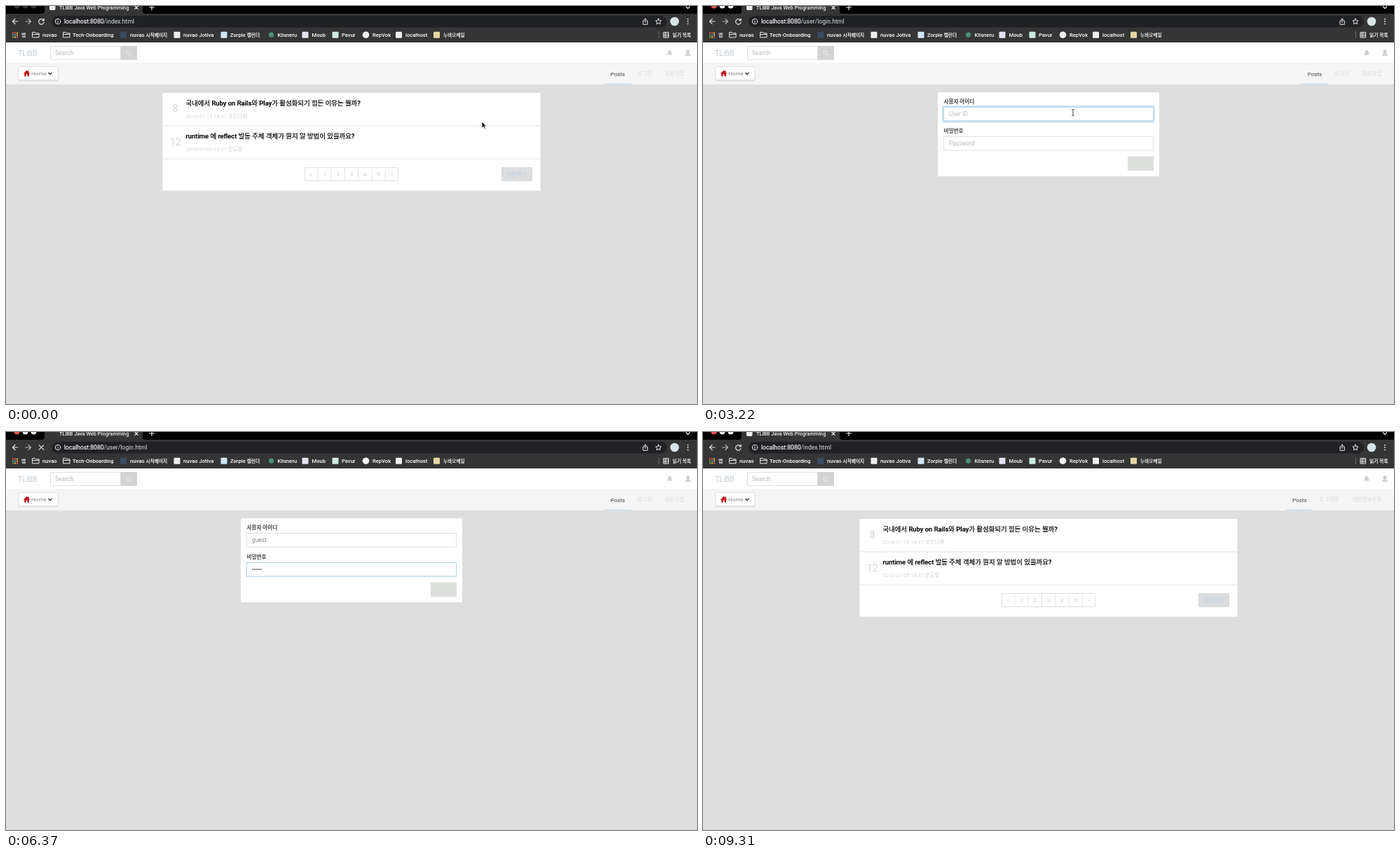
These frames come from a looping animation (986 by 568 pixels, 9.52 s). An HTML page:

```html
<!DOCTYPE html>
<html lang="ko">
<head>
<meta charset="utf-8">
<style>
html, body { margin: 0; width: 100%; height: 100%; overflow: hidden; background: #dedede; }
svg { display: block; width: 986px; height: 568px; }
text { font: 8px Roboto, "Noto Sans CJK KR", "Noto Sans CJK", sans-serif; white-space: pre; }
.mark text { font-size: 7.6px; font-weight: 500; fill: #fff; }
.mark .ko { font-size: 6.7px; stroke: #fff; stroke-width: .2; }
.line { fill: none; stroke: #e6e6e6; stroke-width: 1.2; stroke-linecap: round; stroke-linejoin: round; }
.title { font-size: 9.42px; font-weight: 500; fill: #000; stroke: #000; stroke-width: .22; }
.meta { font-size: 7.5px; fill: #d6d9d9; }
.meta tspan { font-weight: 500; fill: #c9d0d0; }
.count { font-size: 14px; fill: #d6d6d6; text-anchor: middle; }
.page { font-weight: 500; fill: #d6d6d6; text-anchor: middle; }
.box { fill: #fff; stroke: #e0e0e0; }
.label { font-size: 7.6px; font-weight: 500; fill: #111; stroke: #111; stroke-width: .15; }
.hint { font-size: 8.3px; fill: #b8b8b8; }
.faint { font-size: 7.7px; fill: #dadada; }
.posts { fill: #444; }
.under { fill: #cfe1ec; }
</style>
</head>
<body>
<svg viewBox="0 0 986 568">
  <rect width="986" height="568" fill="#dedede"/>

  <!-- browser window -->
  <rect width="986" height="52" fill="#353535"/>
  <path d="M0 0H55V7Q55 11 51 11H0ZM195 0H986V11H199Q195 11 195 7Z" fill="#000"/>
  <g id="lights"><circle cx="15.5" cy="-.5" r="4"/><circle cx="27.5" cy="-.5" r="4"/><circle cx="39.5" cy="-.5" r="4"/></g>
  <rect id="favicon" x="62" y="-3" width="8.5" height="9" rx="2" fill="#eee"/>
  <text x="76" y="4.6" style="font-size:7.3px;font-weight:500" fill="#eee">TLiBB Java Web Programming</text>
  <path class="line" d="M183.8 0l4.4 4.4m0-4.4l-4.4 4.4M204.5 2h7M208-2V5.5M970.5 1l2.5 2.5l2.5-2.5"/>
  <rect x="65" y="14" width="878" height="16.5" rx="8.2" fill="#202124"/>
  <path class="line" d="M17 22H9.5m3.5-3.5L9.5 22l3.5 3.5"/>
  <path class="line" style="stroke:#b5b5b5" d="M28 22h7.5m-3.5-3.5l3.5 3.5l-3.5 3.5"/>
  <path id="reload" class="line" d="M53.3 19.8A3.8 3.8 0 1 0 54.2 23M54.2 18v2.6h-2.6"/>
  <path id="stop" class="line" d="M47.3 18.8l6.4 6.4m0-6.4l-6.4 6.4"/>
  <circle cx="74" cy="22" r="3.7" class="line" style="stroke-width:1"/>
  <path class="line" style="stroke-width:1" d="M74 21.8v2M74 20v.1"/>
  <text x="83" y="25.2" style="font-size:8.6px" fill="#dcdee0"><tspan fill="#fff" stroke="#fff" stroke-width=".15">localhost:8080</tspan><tspan id="path"></tspan></text>
  <path class="line" style="stroke-width:1" d="M910.5 21H909v5.3h6.3V21h-1.6M912.1 23.5V18m-1.6 1.5l1.6-1.6l1.6 1.6M931 18l1.2 2.7l2.9.3l-2.2 2l.6 2.9l-2.5-1.5l-2.5 1.5l.6-2.9l-2.2-2l2.9-.3Z"/>
  <circle cx="954" cy="22" r="6.3" fill="#d7e4e6"/>
  <path d="M973 18.7v.1M973 22v.1M973 25.3v.1" class="line" style="stroke-width:1.8"/>
  <g id="marks" class="mark"></g>
  <path d="M931.5 36.5V46" stroke="#666"/>
  <path class="line" style="stroke-width:1" d="M938.5 37.5h7v7.5h-7ZM941 37.5V45M938.5 40h7M938.5 42.5h7"/>

  <!-- site header -->
  <rect y="52" width="986" height="30" fill="#fff"/>
  <rect y="82" width="986" height="30" fill="#f5f5f5"/>
  <path d="M0 82H986" stroke="#f0f0f0"/>
  <text x="17" y="70.5" style="font-size:10.6px;font-weight:300" fill="#a3b4c1">TLiBB</text>
  <rect class="box" x="63.5" y="57.5" width="100" height="19"/>
  <text class="hint" x="70" y="70" style="font-size:8.5px">Search</text>
  <rect x="163.5" y="57" width="23.5" height="20" fill="#d3d3d3"/>
  <path d="M177 68.7l2 2M177.4 66.5a2.8 2.8 0 1 1-5.6 0a2.8 2.8 0 1 1 5.6 0" class="line" style="stroke:#e4e4e4"/>
  <path d="M943 69.5q1.5-1 1.5-3.5q0-3 2.5-3t2.5 3q0 2.5 1.5 3.5ZM946 70.3h2l-1 1ZM970.5 65a2.5 2.7 0 0 1 5 0q0 2-1.2 3q3.2.6 3.2 3h-9q0-2.4 3.2-3q-1.2-1-1.2-3" fill="#d0d0d0"/>
  <rect x="17.5" y="87.3" width="57" height="20" rx="2" fill="#dcdcdc"/>
  <rect class="box" x="17.8" y="86.5" width="56.4" height="19.2" rx="2"/>
  <path d="M24.8 96.5l4.8-4.8l1.8 1.8v-1.3h1.3v2.6l1.7 1.7h-1.4v3.9h-2.4v-2.8h-2v2.8h-2.4v-3.9Z" fill="#c3121a"/>
  <text x="36" y="99.4" style="font-size:8.1px" fill="#888">Home</text>
  <path d="M60.5 95l2.5 2.5l2.5-2.5" fill="none" stroke="#444" stroke-width="1.7"/>
  <g id="guestNav">
    <text class="posts" x="862.7" y="99.5">Posts</text><rect class="under" x="853" y="110.6" width="39" height="1.4"/>
    <text id="login" class="faint" x="901" y="99.3">로그인</text><rect id="loginLine" class="under" x="892" y="110.6" width="39.5" height="1.4"/>
    <text class="faint" x="940" y="99.3">회원가입</text>
  </g>
  <g id="memberNav">
    <text class="posts" x="841" y="99.5">Posts</text><rect class="under" x="832" y="110.6" width="38.5" height="1.4"/>
    <text class="faint" x="879" y="99.3">로그아웃</text><text class="faint" x="926" y="99.3">개인정보수정</text>
  </g>

  <!-- post list -->
  <g id="list">
    <rect x="223.5" y="124" width="539" height="139.5" fill="#fff"/>
    <path d="M223.5 171H762.5M223.5 218H762.5" stroke="#e4e4e4"/>
    <text class="count" x="241.5" y="151.3">8</text>
    <text class="title" x="256.5" y="142">국내에서 Ruby on Rails와 Play가 활성화되기 힘든 이유는 뭘까?</text>
    <text class="meta" x="256.5" y="160">2016-01-15 18:47 <tspan>코드나래</tspan></text>
    <text class="count" x="242" y="198.8">12</text>
    <text class="title" x="256.5" y="189.3">runtime 에 reflect 발동 주체 객체가 뭔지 알 방법이 있을까요?</text>
    <text class="meta" x="256.5" y="207.2">2016-01-05 18:47 <tspan>한도빛</tspan></text>
    <g id="pager"><rect class="box" x="426.5" y="230.5" width="133" height="19" rx="1.5"/></g>
    <rect x="707" y="230" width="44" height="20" fill="#dcddde"/>
    <text x="714.5" y="242.6" style="font-size:7.6px;font-weight:300" fill="#b9cbdf">질문하기</text>
  </g>

  <!-- login form -->
  <g id="form">
    <rect x="335" y="123" width="316" height="120" rx="2" fill="#fff"/>
    <text class="label" x="343.5" y="138.7">사용자 아이디</text>
    <text class="label" x="343.5" y="180.5">비밀번호</text>
    <rect class="box" x="343.5" y="144.5" width="299" height="19.5"/>
    <rect class="box" x="343.5" y="186.5" width="299" height="19.5"/>
    <g id="focus" fill="none">
      <rect id="glow" x="342.5" y="143.5" width="301" height="21.5" rx="1.5" stroke="#cfe3f0" stroke-width="3"/>
      <rect x="343.5" y="144.5" width="299" height="19.5" stroke="#b4d5e8"/>
    </g>
    <text id="user" class="hint" x="351" y="157.3"></text>
    <text id="pass" class="hint" x="351" y="199">Password</text>
    <g id="dots" fill="#444"></g>
    <rect id="caret" width=".9" height="9.5" fill="#333"/>
    <rect x="606" y="214.5" width="37" height="20.5" fill="#dcdfdc"/>
  </g>

  <path id="arrow" d="M0 0V9.2L2.1 7.3L3.5 10.4L5 9.8L3.7 6.8H6.5Z" fill="#111" stroke="#fff" stroke-width=".7"/>
  <path id="hand" d="M-1 .8q.9-1 1.6 0V4q2.2-.5 3.9.5q1 .6.6 2.8l-.9 2.5H-.5L-3.2 6.2q.4-1.4 2.2 0Z" fill="#fff" stroke="#222" stroke-width=".9"/>
  <path id="beam" d="M-1.8-4.5Q0-4.5 0-3.3V3.3Q0 4.5-1.8 4.5M1.8-4.5Q0-4.5 0-3.3M0 3.3Q0 4.5 1.8 4.5" fill="none" stroke="#333" stroke-width=".9"/>
</svg>
<script>
const LOOP = 9520, STEP = 70, USER = 'guest';
const $ = id => document.getElementById(id);
const show = (id, on) => $(id).style.display = on ? '' : 'none';
const between = (t, a, b) => t >= a && t < b;
const countPast = (times, t) => times.filter(x => t >= x).length;

const square = (x, fill) => `<rect x="${x}" y="36.7" width="9" height="9" rx="1" fill="${fill}"/>`;
const disc = (x, fill, r) => `<circle cx="${x + 4.5}" cy="41.2" r="${r}" fill="${fill}"/>`;
const folder = x => `<path class="line" style="stroke-width:1" d="M${x} 37.5h3.3l1 1.3h4.7v6h-9ZM${x} 40.5h9"/>`;
const ko = s => s.replace(/[가-힣]+/g, '<tspan class="ko">$&</tspan>');
const bookmarks = [
  ['', 22, '앱'],
  [folder(38), 52, 'nuvao'],
  [folder(82), 95, 'Tech-Onboarding'],
  [square(163, '#3a4d63'), 177, 'nuvao 시작페이지'],
  [square(239.5, '#eee'), 253, 'nuvao Jotiva'],
  [square(306.5, '#d3e4f2'), 320, 'Zorple 캘린더'],
  [disc(374, '#4a9273', 3.6), 387.5, 'Klisneru'],
  [square(422.5, '#e3e3ef'), 436.5, 'Moub'],
  [square(465.5, '#c9eadc'), 479, 'Pavur'],
  [disc(509, '#f5f5f5', 4.8), 523, 'RepVok'],
  [square(556, '#f0f0f0'), 570, 'localhost'],
  [square(610, '#e3d6a2'), 624, '누바오메일'],
  ['', 951, '읽기 목록']
];
const appColors = ['#e5594f', '#e5594f', '#efb93e', '#5fae6b', '#5b8fe0', '#efb93e', '#5fae6b', '#efb93e', '#e5594f'];
$('marks').innerHTML =
  appColors.map((c, i) => `<rect x="${9 + i % 3 * 3}" y="${37.5 + (i / 3 | 0) * 3}" width="2" height="2" fill="${c}"/>`).join('') +
  bookmarks.map(([icon, x, name]) => `${icon}<text x="${x}" y="43.6">${ko(name)}</text>`).join('');

$('pager').innerHTML += [...'«12345»'].map((s, i) => {
  const x = 425.5 + i * 19.3;
  return (i ? `<path d="M${x} 230.5v19" stroke="#e5e5e5"/>` : '') +
    `<text class="page" x="${x + 9.6}" y="243">${s}</text>`;
}).join('');

$('dots').innerHTML = [...USER].map((_, i) =>
  `<circle cx="${352.4 + i * 2.8}" cy="196" r=".9"/>`).join('');

// pointer stops: time, x, y
const route = [
  [0, 679, 165], [140, 820, 113], [280, 820, 113], [910, 919, 102], [1470, 919, 102],
  [1680, 903, 103], [2100, 903, 103], [2520, 528, 152], [8330, 528, 151],
  [8470, 528, 151], [9310, 552, 572], [LOOP, 552, 572]
];
function pointer(t) {
  const i = route.findIndex((p, n) => t < route[n + 1][0]);
  const [a, b] = [route[i], route[i + 1]];
  const k = (t - a[0]) / (b[0] - a[0]), e = k * k * (3 - 2 * k);
  return [a[1] + (b[1] - a[1]) * e, a[2] + (b[2] - a[2]) * e];
}

const userKeys = [4480, 4620, 4830, 4900, 5040];
const passKeys = [5460, 5600, 5740, 5810, 6020];
const FOCUS = 2660, TAB = 5250, SUBMIT = 6300, MEMBER = 6440;

function draw(t) {
  const form = between(t, 1890, MEMBER), member = t >= MEMBER;
  const loading = between(t, 1820, 1890) || between(t, SUBMIT, MEMBER);
  const active = t >= 1120;
  [...$('lights').children].forEach((c, i) =>
    c.setAttribute('fill', !active ? '#333' : i ? '#eee' : '#f4554c'));
  show('favicon', !loading);
  show('reload', !loading);
  show('stop', loading);
  $('path').textContent = form ? '/user/login.html' : '/index.html';
  show('list', !form);
  show('form', form);
  show('guestNav', !member);
  show('memberNav', member);

  const hover = between(t, 1540, 2170);
  $('login').style.fill = hover ? '#333' : '';
  show('loginLine', hover);

  const typed = countPast(userKeys, t), dots = countPast(passKeys, t);
  const onPass = t >= TAB;
  $('user').textContent = typed ? USER.slice(0, typed) : 'User ID';
  $('user').style.fill = typed ? '#888' : '';
  show('pass', !dots);
  [...$('dots').children].forEach((d, i) => d.style.display = i < dots ? '' : 'none');

  show('focus', t >= FOCUS);
  $('focus').setAttribute('transform', `translate(0 ${onPass ? 42 : 0})`);
  $('focus').style.opacity = Math.min(1, (t - (onPass ? TAB : FOCUS) + STEP) / 200);
  show('glow', t < SUBMIT);

  const lastKey = Math.max(FOCUS, onPass ? TAB : 0, ...[...userKeys, ...passKeys].filter(k => k <= t));
  show('caret', between(t, FOCUS, SUBMIT) && (t - lastKey) % 1000 < 500);
  if (form) {
    const width = onPass ? dots * 2.8 : typed ? $('user').getComputedTextLength() : 0;
    $('caret').setAttribute('x', 351 + width);
    $('caret').setAttribute('y', onPass ? 191.5 : 149.7);
  }

  const visible = t < userKeys[0] || t >= 8330;
  const hand = between(t, 1540, 2170), beam = between(t, 2520, userKeys[0]);
  const [x, y] = pointer(t);
  for (const [id, on] of [['hand', hand], ['beam', beam], ['arrow', !hand && !beam]]) {
    show(id, visible && on);
    $(id).setAttribute('transform', `translate(${x} ${y})`);
  }
}

const start = performance.now();
function tick() {
  const t = (performance.now() - start) % LOOP;
  draw(Math.floor(t / STEP) * STEP);
  requestAnimationFrame(tick);
}
tick();
</script>
</body>
</html>
```
